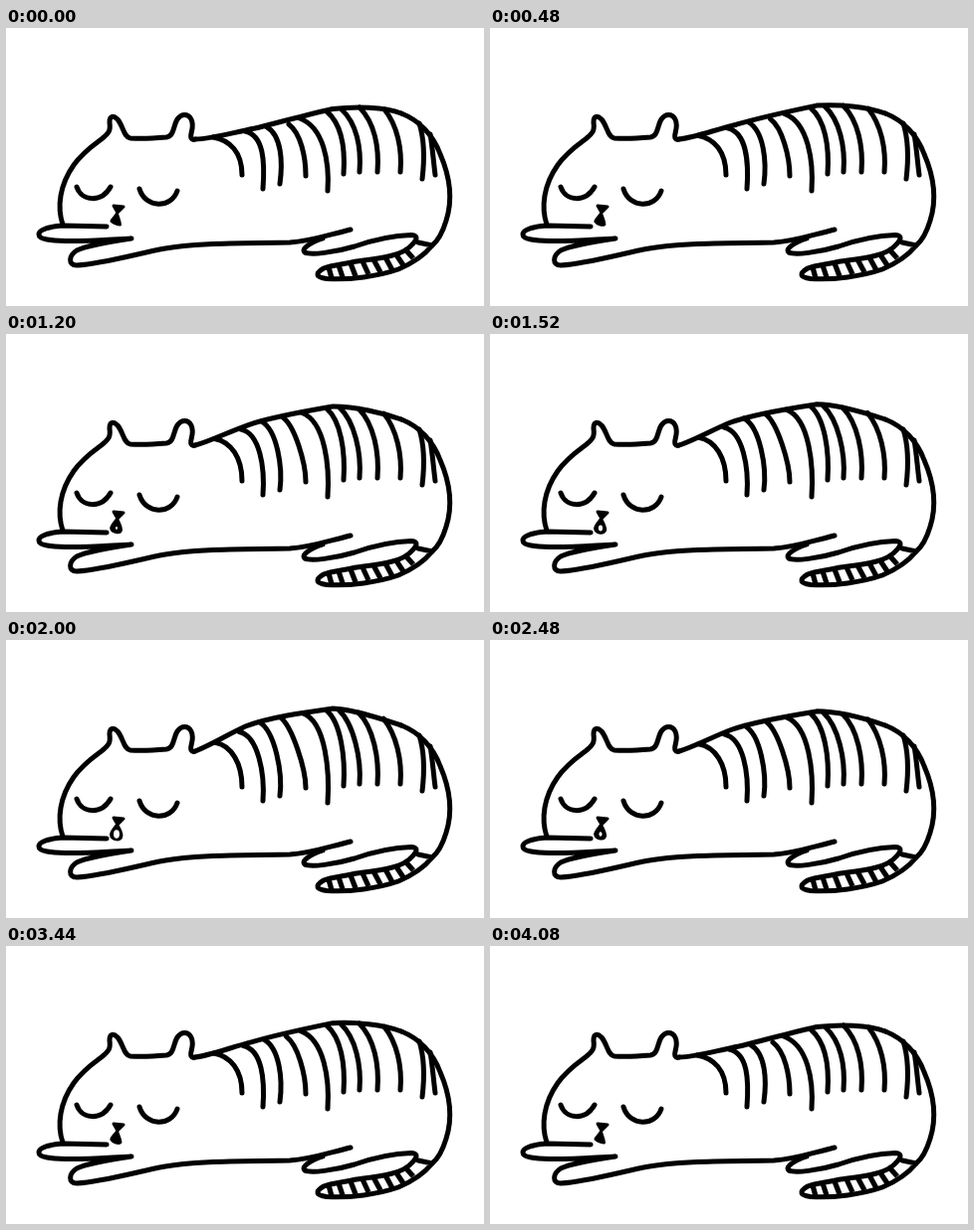
An HTML page that plays this animation: 480x280 px, repeating every 4.16 s.

```html
<!DOCTYPE html>
<html lang="en">
<head>
<meta charset="utf-8">
<title>Sleeping cat</title>
<style>
  html, body { margin: 0; width: 100%; height: 100%; overflow: hidden; background: #fff; }
  svg { display: block; width: 480px; height: 280px; }
  path { fill: none; stroke: #000; stroke-width: 5; stroke-linecap: round; stroke-linejoin: round; }
  .tail { stroke-width: 5.2; stroke-linecap: butt; }
  .solid { fill: #000; stroke-width: 3; }
</style>
</head>
<body>
<svg viewBox="0 0 480 280">
  <!-- head and ears -->
  <path d="M57 198C51 180 54 158 68 138C77 125 89 117 97 111C104 105 105 103 104 95C104 88 108 88 112 92C118 99 118 110 125 111C138 112 150 111 161 110C169 109 168 98 172 92C176 86 183 86 186 92C190 100 184 107 186 111Q187 113 190 112"/>
  <path d="M71 160C76 175 96 176 105 160M134 162C140 182 166 182 172 164"/>
  <!-- front paws and belly -->
  <path d="M101 200L57 199C44 200 33 203 33 208C33 213 46 214 60 214.5C82 215 104 213 126 212C105 215 82 219 71 224C63 229 62 239 71 239C100 237 132 227 160 222C190 216 245 217 285 216C305 215 318 210 346 203"/>
  <!-- hind leg, rump and tail -->
  <path d="M318 212C306 216 296 222 300 226C306 229 330 226 350 220C370 213 390 209 407 208.5C414 209 413 213 408 218C398 230 375 232 352 235C338 238 326 239 319 242C309 248 312 251 322 252.5C345 254 374 250 394 243C408 237 420 229 428 219L414 216"/>
  <path d="M397 86C415 93 429 108 436 127C446 150 449 172 442 194C439 204 434 214 428 219"/>
  <path class="tail" d="M324 241L327 252M334 239L338 251M346 237L351 250M358 235L364 248M369 233L376 246M381 231L388 244M391 227L399 239M400 222L409 232"/>
  <!-- stripes that stay still -->
  <path d="M415 96C421 115 420 135 418 152M426 107C428 118 429 132 431 148"/>
  <path id="back"/>
  <path id="stripes"/>
  <path class="solid" d="M108 179L118 180L112 186Z"/>
  <path id="mouth" class="solid"/>
  <ellipse id="hole" cx="111" cy="195.5" fill="#fff"/>
</svg>
<script>
const STEP = 80, LOOP = 4160, FULL = 1840, TURN = 1920, END = 4080;

const back = [
  'M190 112C205 112 225 106 250 101C270 96 300 88 328 81.5C350 79 380 79 397 86',
  'M190 112C205 106 224 94 240 86.5C264 77 302 72 328 68.5C350 69.5 378 80 397 86'
];
const mouth = [
  'M111.5 187C110 190 106 193 106 194.5C108 196 112 198 114.5 198C114 194 112.5 191 111.5 187',
  'M111.5 186C109 189 105.5 193 105.5 196C105.5 202 116 203 116 197C116 193 113.5 189 111.5 186'
];
// top when breathed out, top when breathed in, bend from the top, fixed lower curve
const stripes = [
  [208, 110, 210, 103, 17, 3, '237 125 237 148'],
  [240, 104, 234, 92, 19, 4, '260 135 258 162'],
  [261, 99, 254, 82, 16, 9, '278 135 275 157'],
  [284, 97, 275, 77, 12, 9, '301 130 301 149'],
  [295, 91, 298, 73, 24, 9, '325 135 323 164'],
  [322, 84, 322, 70.5, 14, 12, '341 118 339 147'],
  [337, 82, 334, 70, 15, 14, '357 120 355 145'],
  [355, 80, 354, 73, 15, 15, '375 120 373 145'],
  [380, 82, 379, 79, 13, 16, '398 122 396 145']
];

const get = id => document.getElementById(id);
const lerp = (a, b, v) => a + (b - a) * v;

function morph([from, to], v) {
  const ends = to.match(/[\d.]+/g);
  let i = 0;
  return from.replace(/[\d.]+/g, n => lerp(+n, +ends[i++], v).toFixed(2));
}

function stripe([x0, y0, x1, y1, dx, dy, rest], v) {
  const x = lerp(x0, x1, v), y = lerp(y0, y1, v);
  return `M${x} ${y}C${x + dx} ${y + dy} ${rest}`;
}

// breath in, short hold, slower breath out
function breath(t) {
  if (t < TURN) return Math.min(t / FULL, 1);
  return Math.max(1 - (t - TURN) / (END - TURN), 0);
}

function draw(now) {
  const v = breath(Math.floor(now % LOOP / STEP) * STEP);
  const open = Math.max(0, v * 2 - 1);
  get('back').setAttribute('d', morph(back, v));
  get('mouth').setAttribute('d', morph(mouth, v));
  get('stripes').setAttribute('d', stripes.map(s => stripe(s, v)).join(''));
  get('hole').setAttribute('rx', 3.2 * open);
  get('hole').setAttribute('ry', 4.6 * open);
}

const start = performance.now();
function tick() {
  draw(performance.now() - start);
  requestAnimationFrame(tick);
}
tick();
</script>
</body>
</html>
```
